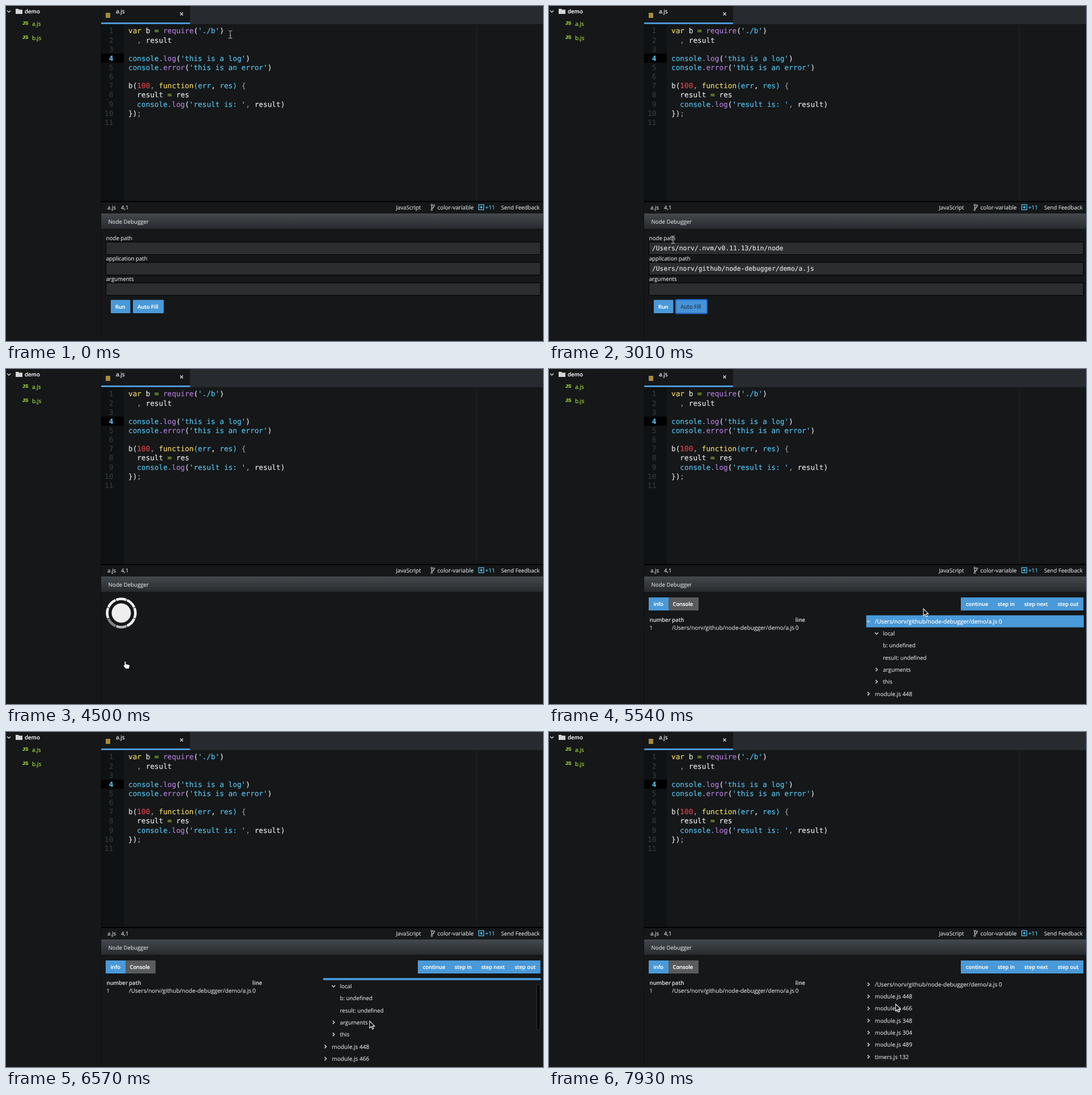
An HTML page for the animation above (8 s loop, 948x591 px).

```html
<!DOCTYPE html>
<html lang="en">
<head>
<meta charset="utf-8">
<title>Node Debugger demo</title>
<style>
  html, body { margin: 0; width: 100%; height: 100%; overflow: hidden; background: #151718; }
  svg { display: block; }
  text { font: 9.7px "Open Sans", sans-serif; color: #ced1d2; white-space: pre; text-rendering: geometricPrecision; }
  text, tspan { fill: currentColor; stroke: currentColor; stroke-width: .2; }
  .code { font: 12.76px "DejaVu Sans Mono", monospace; color: #e0e3e2; }
  .field { font: 11.32px "DejaVu Sans Mono", monospace; color: #e0e3e2; }
  .path { font-size: 10.1px; }
  .bold { font-weight: 600; }
  .button { font-size: 9.3px; font-weight: 600; color: #fff; }
  .icon { font: bold 8.5px "Liberation Sans", sans-serif; }
  .line { fill: none; stroke: #ced1d2; stroke-width: 1.5; }
</style>
</head>
<body>
<svg id="stage" width="948" height="591" viewBox="0 0 948 591"></svg>
<script>
const LOOP = 8000, TICK = 149.2;
const BLUE = '#4a99d8', GREEN = '#a3d93c', CYAN = '#55bfea';
const APP = '/Users/norv/github/node-debugger/demo/a.js';
const INK = { c: CYAN, p: '#ab7ad2', y: '#ecd566', r: '#d8434a', g: GREEN, w: '#e0e3e2', d: '#8f9598' };

const rect = (x, y, w, h, fill, more = '') => `<rect x="${x}" y="${y}" width="${w}" height="${h}" fill="${fill}" ${more}/>`;
const text = (x, y, s, cls = '', color = '') =>
  `<text x="${x}" y="${y}" class="${cls}"${color && ` style="color:${color}"`}>${s}</text>`;
const path = (d, more = 'class="line"') => `<path d="${d}" ${more}/>`;
const group = (id, s) => `<g id="${id}">${s}</g>`;
const chevron = (x, y, open) => path(open ? `M${x - 3} ${y - 1.5}l3 3 3-3` : `M${x - 1.5} ${y - 3}l3 3-3 3`);

// The first letter of each piece picks its colour.
const CODE = [
  ['yvar', 'w b ', 'g= ', 'prequire', 'w(', "c'./b'", 'w)'],
  ['d  , ', 'wresult'],
  [],
  ['cconsole', 'p.log', 'w(', "c'this is a log'", 'w)'],
  ['cconsole', 'p.error', 'w(', "c'this is an error'", 'w)'],
  [],
  ['wb(', 'r100', 'd, ', 'yfunction', 'c(err', 'w, ', 'cres) ', 'd{'],
  ['w  result ', 'g= ', 'wres'],
  ['c  console', 'p.log', 'w(', "c'result is: '", 'd, ', 'wresult)'],
  ['w})', 'd;'],
  []
];

function codeLine(pieces, i) {
  const y = 48.4 + 16.15 * i, current = i === 3;
  const spans = pieces.map(p => `<tspan style="color:${INK[p[0]]}">${p.slice(1)}</tspan>`).join('');
  return text(i < 9 ? 181.8 : 174.1, y, i + 1, 'code', current ? CYAN + ';font-weight:bold' : '#343a3d')
    + text(216, y, spans, 'code');
}

function sidebar() {
  const file = (name, y) => text(29, y + 1.8, 'JS', 'icon', GREEN) + text(46, y + 3.8, name, 'path', GREEN);
  return chevron(5, 9.5, true)
    + path('M17 5h5l1 1.5h6v7.5h-12z', 'fill="#d4d7d6"')
    + text(33, 12.7, 'demo', 'bold', '#f0f2f2')
    + file('a.js', 31) + file('b.js', 56)
    + rect(167, 0, 1, 591, '#0f1112');
}

function editor() {
  return rect(168, 0, 780, 32, '#272b2f') + rect(168, 0, 157, 32, '#151718') + rect(168, 29, 157, 3, BLUE)
    + rect(176, 12, 8, 9, '#a98a3a')
    + text(194, 13, 'a.js', 'path', '#fff')
    + path('M307.5 11.5l5 5m0-5l-5 5')
    + rect(168, 32, 40, 312, '#0f1214') + rect(168, 84, 40, 16, '#000') + rect(830, 32, 1, 312, '#1f2224')
    + CODE.map(codeLine).join('');
}

function statusBar() {
  return rect(168, 344, 780, 2, '#000')
    + text(179, 359, 'a.js') + text(203, 359, '4,1') + text(688.5, 359, 'JavaScript')
    + path('M751.5 352v7M751.5 357q4-1 4-4', 'class="line" style="stroke-width:1.2"')
    + [[751.5, 351], [751.5, 359.5], [755.5, 352]].map(([x, y]) => `<circle cx="${x}" cy="${y}" r="1.4" fill="#151718" stroke="#ced1d2"/>`).join('')
    + text(761.5, 359, 'color-variable', 'path')
    + rect(834.5, 350.5, 9, 9, 'none', `stroke="${CYAN}" stroke-width="1.3"`)
    + path('M836.5 355h5m-2.5-2.5v5', `stroke="${CYAN}" stroke-width="1.6"`)
    + text(846, 359, '+11', 'path', CYAN) + text(874, 359, 'Send Feedback')
    + rect(168, 366, 780, 27, 'url(#heading)') + text(180.5, 384, 'Node Debugger');
}

function form() {
  const field = (label, y) => text(176.7, y - 3.5, label) + rect(176.5, y + .5, 767, 22, '#2b2d2e', 'stroke="#000"');
  return field('node path', 416) + field('application path', 452) + field('arguments', 488)
    + group('filled', text(182, 430.7, '/Users/norv/.nvm/v0.11.13/bin/node', 'field') + text(182, 466.7, APP, 'field'))
    + rect(185, 518.5, 34.5, 23.5, BLUE, 'rx="1"') + text(193, 534, 'Run', 'button')
    + rect(224, 518.5, 54.5, 23.5, BLUE, 'rx="1"')
    + group('idle', text(232.3, 534, 'Auto Fill', 'button'))
    + group('focus', rect(223.5, 518, 55.5, 24.5, '#4693d6', 'rx="2" stroke="#1d62c4" stroke-width="2"')
      + text(232.3, 534, 'Auto Fill', '', '#1b3a57'));
}

function loader() {
  const segments = [...Array(8).keys()].map(i =>
    `<path class="segment" d="M-9 -23.2A24.9 24.9 0 0 1 9 -23.2" fill="none" stroke="#eee" stroke-width="4.6" transform="rotate(${i * 45})"/>`);
  return `<g transform="translate(203.5 430.5)">${segments.join('')}<circle r="17" fill="#eee"/></g>`;
}

// Each row: indent level, label, state of its chevron ('' for none).
function tree(rows) {
  return rows.map(([level, label, state], i) => {
    const y = 445.2 + 21.28 * i, x = 564 + 14.3 * level;
    return (state ? chevron(x, y, state === 'open') : '')
      + text(x + 11.3, y + 3.7, label, level ? '' : 'path', !level && state === 'open' ? '#fff' : '');
  }).join('');
}

function debuggerPanel() {
  const calls = ['module.js 448', 'module.js 466', 'module.js 348', 'module.js 304', 'module.js 489', 'timers.js 132', 'node.js 902']
    .map(s => [0, s, 'shut']);
  const locals = [[1, 'local', 'open'], [1, 'b: undefined', ''], [1, 'result: undefined', ''], [1, 'arguments', 'shut'], [1, 'this', 'shut']];
  const actions = [[736, 'continue'], [792, 'step in'], [839, 'step next'], [898, 'step out']];
  return rect(176, 403, 35, 23, BLUE) + rect(211, 403, 53, 23, '#595b5c')
    + text(184.5, 418, 'info', 'button') + text(218.5, 418, 'Console', 'button')
    + rect(727, 403, 216.5, 23, BLUE) + actions.map(([x, s]) => text(x, 418, s, 'button')).join('')
    + text(177.5, 445.5, 'number', 'bold') + text(217, 445.5, 'path', 'bold') + text(435, 445.5, 'line', 'bold')
    + text(177.5, 460, '1') + text(217, 460, APP, 'path') + text(435, 460, '0', 'path')
    + `<g clip-path="url(#list)">`
    + group('expanded', rect(560, 434.5, 384, 21.3, BLUE) + tree([[0, APP + ' 0', 'open'], ...locals, ...calls]))
    + group('collapsed', tree([[0, APP + ' 0', 'shut'], ...calls]))
    + rect(936.5, 435.5, 6.5, 81, '#08090a', 'id="thumb" rx="3" stroke="#36393b"') + '</g>';
}

const cursors = group('arrow', path('M0 0v12.2l2.9-2.6 2 4.6 2-.9-2-4.4h3.9z', 'fill="#000" stroke="#fff" stroke-width="1.1"'))
  + group('beam', path('M-3.5-6.5q3 0 3.5 1.5q.5-1.5 3.5-1.5M0-5v11M-3.5 7q3 0 3.5-1.5q.5 1.5 3.5 1.5M-1.5 2h3', 'fill="none" stroke="#a9acad" stroke-width="1.1"'))
  + group('hand', path('M-1.5 1.2Q-1.5-.5-.1-.5T1.3 1.2V4.5L6.5 5.5Q8 6 8 7.5L7.2 11 6.5 13H1L-2.5 9Q-4.5 7-3.3 6.3T-1.5 7.1z', 'fill="#fff" stroke="#000" stroke-width=".9"'));

document.getElementById('stage').innerHTML = `<defs>
  <linearGradient id="heading" x2="0" y2="1"><stop stop-color="#44494d"/><stop offset="1" stop-color="#282b2e"/></linearGradient>
  <clipPath id="list">${rect(560, 434, 384, 154, '#fff')}</clipPath></defs>`
  + rect(0, 0, 948, 591, '#151718') + sidebar() + editor() + statusBar()
  + group('form', form()) + group('loader', loader()) + group('debugger', debuggerPanel()) + group('cursor', cursors);

// Pointer route: tick, x, y, shape.
const ROUTE = [
  [0, 396, 50, 'beam'], [2, 396, 50, 'beam'], [5, 350, 170, 'beam'], [6, 318, 350, 'arrow'], [8, 262, 487, 'arrow'],
  [9, 262, 487, 'arrow'], [12, 250, 548, 'arrow'], [14, 248, 535, 'hand'], [16, 243, 528, 'hand'], [18, 243, 528, 'hand'],
  [19, 228, 455, 'arrow'], [20, 219, 412, 'beam'], [21, 219, 414, 'beam'], [22, 215, 465, 'arrow'], [23, 211, 525, 'hand'],
  [24, 209, 540, 'hand'], [28, 209, 540, 'hand'], [32, 212, 492, 'arrow'], [35, 652, 408, 'arrow'], [36, 652, 408, 'arrow'],
  [37, 661, 423, 'arrow'], [39, 642, 510, 'arrow'], [47, 642, 510, 'arrow'], [50, 600, 446, 'arrow'], [51, 600, 446, 'arrow'],
  [53, 612, 480, 'arrow']
];
const SCROLL = [[40, 0], [44, 18], [47, 0]];

function along(keys, tick, column) {
  const next = keys.findIndex(k => k[0] > tick);
  if (next < 1) return keys.at(next)[column];
  const a = keys[next - 1], b = keys[next];
  return a[column] + (b[column] - a[column]) * (tick - a[0]) / (b[0] - a[0]);
}

const el = id => document.getElementById(id);
const show = (id, on) => { el(id).style.display = on ? '' : 'none'; };
const segments = document.querySelectorAll('.segment');

function draw() {
  const tick = Math.floor(performance.now() % LOOP / TICK);
  show('form', tick < 26);
  show('loader', tick >= 26 && tick < 31);
  show('debugger', tick >= 31);
  show('filled', tick >= 17);
  show('focus', tick >= 17);
  show('idle', tick < 17);

  segments.forEach((s, i) => {
    const lag = (i - 1 - (tick - 26) + 64) % 8;
    s.setAttribute('opacity', lag === 0 ? .5 : lag === 7 ? .75 : 1);
  });

  const scroll = along(SCROLL, tick, 1);
  show('expanded', tick < 51);
  show('collapsed', tick >= 51);
  show('thumb', scroll > 0);
  el('expanded').setAttribute('transform', `translate(0 ${-scroll})`);
  el('thumb').setAttribute('transform', `translate(0 ${scroll * .53})`);

  const shape = ROUTE.findLast(k => k[0] <= tick)[3];
  ['arrow', 'beam', 'hand'].forEach(id => show(id, id === shape));
  el('cursor').setAttribute('transform', `translate(${along(ROUTE, tick, 1)} ${along(ROUTE, tick, 2)})`);
  requestAnimationFrame(draw);
}
draw();
</script>
</body>
</html>
```
